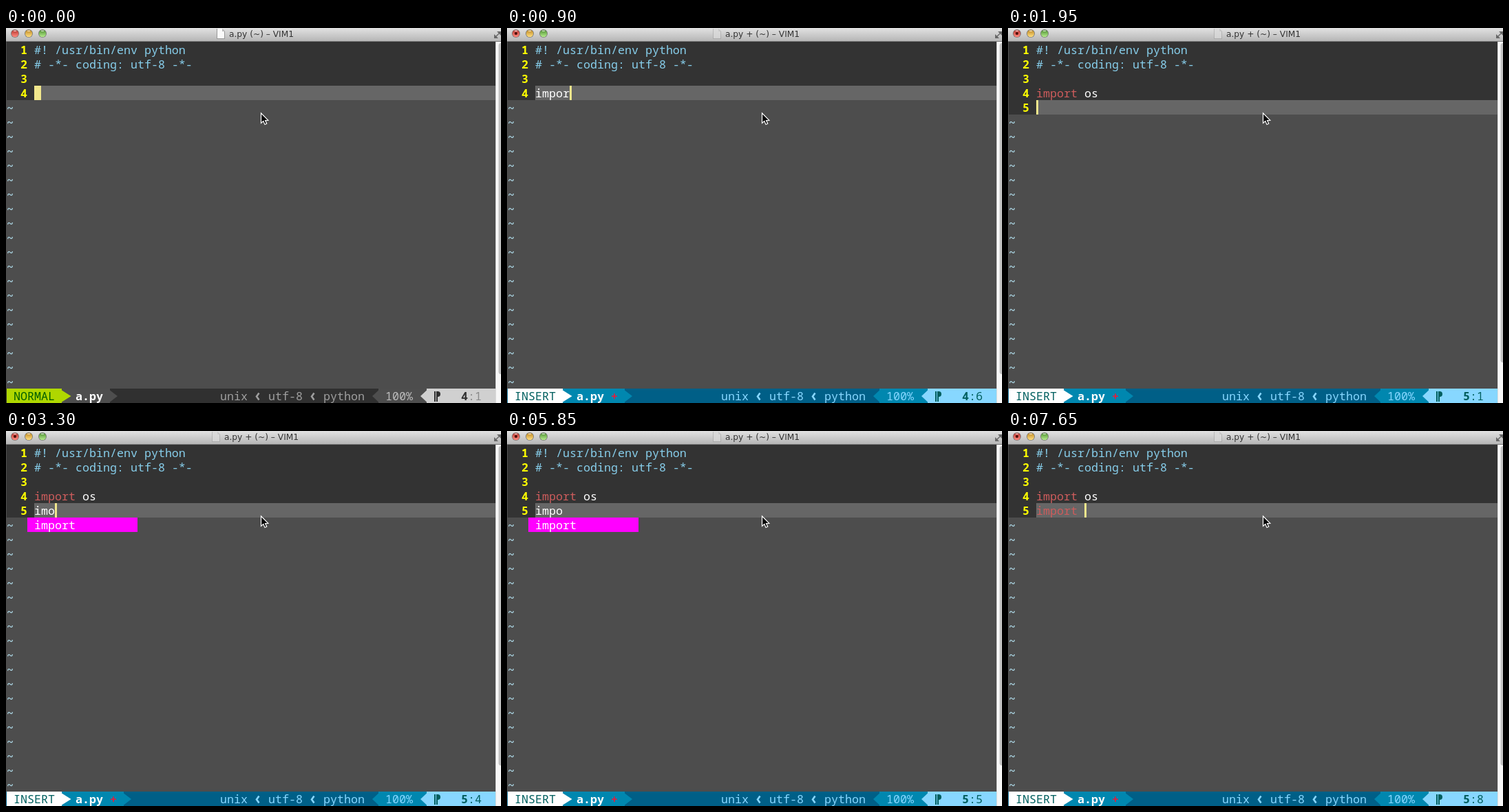
Animation, 719 px wide and 546 px high, one loop 8000 ms. Source, as an HTML page with a canvas:

```html
<!DOCTYPE html>
<html lang="en">
<head>
<meta charset="utf-8">
<title>Typing in an editor</title>
<style>
  html, body { margin: 0; width: 100%; height: 100%; overflow: hidden; background: #4d4d4d; }
  canvas { display: block; }
</style>
</head>
<body>
<canvas id="stage" width="719" height="546"></canvas>
<script>
const ctx = document.getElementById('stage').getContext('2d');
const LOOP = 8000, CELL = 10, ROW = 21, LEFT = 1, TEXT_X = 41, STATUS_Y = 525;
const MONO = '16.667px "Noto Sans Mono", "DejaVu Sans Mono", monospace';

const themes = {
  NORMAL: { mode: '#afd700', modeText: '#005f00', file: '#4e4e4e', middle: '#303030',
            info: '#9e9e9e', percent: '#bcbcbc', line: '#d0d0d0', lineText: '#303030', column: '#8a8a8a' },
  INSERT: { mode: '#ffffff', modeText: '#005f5f', file: '#0087af', middle: '#005f87',
            info: '#87d7ff', percent: '#87d7ff', line: '#87d7ff', lineText: '#005f5f', column: '#005f5f' }
};

// Each step changes only the listed parts of the editor state.
const steps = [
  { at: 0, mode: 'NORMAL', line: 4, text: '', pos: '4:1', cursor: true, popup: false, edited: false },
  { at: 300, mode: 'INSERT' },
  { at: 450, text: 'i', pos: '4:2', edited: true },
  { at: 600, text: 'im', pos: '4:3' },
  { at: 900, text: 'impor', pos: '4:6' },
  { at: 1050, text: 'import', pos: '4:7', keyword: true },
  { at: 1200, text: 'import ', pos: '4:8' },
  { at: 1500, text: 'import o', pos: '4:9' },
  { at: 1800, text: 'import os', pos: '4:10' },
  { at: 1950, line: 5, text: '', pos: '5:1', keyword: false },
  { at: 2700, text: 'i', pos: '5:2' },
  { at: 2850, text: 'im', pos: '5:3', popup: true },
  { at: 3300, text: 'imo', pos: '5:4' },
  { at: 3900, text: 'im' },
  { at: 4650, cursor: false },
  { at: 4950, cursor: true },
  { at: 5100, text: 'imp', popup: false },
  { at: 5250, text: 'impo', pos: '5:5', popup: true },
  { at: 5850, cursor: false },
  { at: 6150, cursor: true },
  { at: 6600, text: 'impor', pos: '5:6' },
  { at: 7350, cursor: false },
  { at: 7500, text: 'import', cursor: true, popup: false },
  { at: 7650, text: 'import ', pos: '5:8', keyword: true }
];

const stateAt = time => Object.assign({}, ...steps.filter(step => step.at <= time));

function rect(x, y, w, h, color) {
  ctx.fillStyle = color;
  ctx.fillRect(x, y, w, h);
}

function polygon(points, color) {
  ctx.fillStyle = color;
  ctx.beginPath();
  points.forEach(([x, y]) => ctx.lineTo(x, y));
  ctx.closePath();
  ctx.fill();
}

function circle(x, y, r, color) {
  ctx.fillStyle = color;
  ctx.beginPath();
  ctx.arc(x, y, r, 0, Math.PI * 2);
  ctx.fill();
}

// Monospaced text, with y at the top of its row.
function write(text, x, y, color, weight = 500) {
  ctx.font = `${weight} ${MONO}`;
  ctx.fillStyle = color;
  ctx.fillText(text, x, y + 17);
}

function verticalGradient(top, bottom, from, to) {
  const gradient = ctx.createLinearGradient(0, top, 0, bottom);
  gradient.addColorStop(0, from);
  gradient.addColorStop(1, to);
  return gradient;
}

function drawTitleBar(edited) {
  rect(0, 0, 719, 20, verticalGradient(0, 20, '#e2e2e2', '#b4b4b4'));
  rect(0, 19, 719, 1, '#777777');

  [['#b8362f', '#ff8a80'], ['#c08a24', '#ffdf80'], ['#4f9132', '#b5ec8c']].forEach(([dark, light], i) => {
    const x = 13 + 20 * i;
    circle(x, 8, 6, '#777777');
    circle(x, 8, 5.2, verticalGradient(3, 13, dark, light));
    rect(x - 2, 3.5, 4, 1.5, '#ffffffaa');
  });
  if (edited) circle(13, 8, 2, '#4a0c08');

  const x = edited ? 317 : 324;
  ctx.globalAlpha = edited ? 0.5 : 1;
  polygon([[x - 18, 1], [x - 10, 1], [x - 6, 5], [x - 6, 16], [x - 18, 16]], '#999999');
  polygon([[x - 17, 1], [x - 10, 1], [x - 7, 5], [x - 7, 15], [x - 17, 15]], '#fafafa');
  polygon([[x - 10, 1], [x - 6, 5], [x - 10, 5]], '#bbbbbb');
  ctx.globalAlpha = 1;
  ctx.font = '12.2px "DejaVu Sans", sans-serif';
  ctx.fillStyle = '#333333';
  ctx.fillText(`a.py ${edited ? '+ ' : ''}(~) – VIM1`, x, 13);

  polygon([[713, 5], [719, 5], [719, 11]], '#666666');
  polygon([[709, 9], [709, 15], [715, 15]], '#666666');
  ctx.strokeStyle = '#666666';
  ctx.lineWidth = 1.5;
  ctx.beginPath();
  ctx.moveTo(711, 13);
  ctx.lineTo(717, 7);
  ctx.stroke();
}

function drawScrollBar(line) {
  const end = line === 4 ? 504 : 487;
  rect(711, 20, 8, 526, '#f7f7f7');
  rect(711, 20, 1, 526, '#dddddd');
  ctx.fillStyle = '#c1c1c1';
  ctx.beginPath();
  ctx.roundRect(715.5, 22, 7, end - 22, 3.5);
  ctx.fill();
}

function drawCode(text, y, keyword) {
  const split = keyword ? 6 : 0;
  write(text.slice(0, split), TEXT_X, y, '#cd5c5c');
  write(text.slice(split), TEXT_X + split * CELL, y, '#ffffff');
}

function drawBuffer({ mode, line, text, keyword, cursor, popup }) {
  const y = line * ROW;
  rect(0, 20, 711, 505, '#4d4d4d');
  rect(1, 20, 710, y + ROW - 20, '#333333');
  rect(TEXT_X, y, 670, ROW, '#666666');

  for (let n = 1; n < 25; n++) {
    if (n <= line) write(String(n), 21, n * ROW, '#ffff00', 600);
    else write('~', LEFT, n * ROW + 1, '#add8e6', 700);
  }
  write('#! /usr/bin/env python', TEXT_X, ROW, '#87ceeb');
  write('# -*- coding: utf-8 -*-', TEXT_X, 2 * ROW, '#87ceeb');
  if (line === 5) drawCode('import os', 4 * ROW, true);
  drawCode(text, y, keyword);

  if (cursor) rect(TEXT_X + text.length * CELL, y, mode === 'NORMAL' ? CELL : 3, ROW, '#f0e68c');
  if (popup) {
    rect(31, y + ROW, 160, ROW, '#ff00ff');
    write('import', TEXT_X, y + ROW, '#ffffff');
  }
}

function arrow(x, direction, color, length = 9) {
  polygon([[x, 527.5], [x + direction * length, 536], [x, 544.5]], color);
}

function chevron(x, color) {
  ctx.strokeStyle = color;
  ctx.lineWidth = 2.6;
  ctx.beginPath();
  ctx.moveTo(x + 7.5, 531.5);
  ctx.lineTo(x + 4, 536.5);
  ctx.lineTo(x + 7.5, 541.5);
  ctx.stroke();
}

function lineSymbol(x, y, color) {
  rect(x, y, 2, 15, color);
  rect(x + 3, y, 2, 15, color);
  ctx.beginPath();
  ctx.arc(x + 5, y + 4, 4, -Math.PI / 2, Math.PI / 2);
  ctx.fill();
}

function drawStatus({ mode, pos, edited }) {
  const c = themes[mode], y = STATUS_Y;
  const fileEnd = edited ? 171 : 151;
  rect(0, y, 711, ROW, c.middle);
  rect(LEFT, y, 80, ROW, c.mode);
  rect(81, y, fileEnd - 81, ROW, c.file);
  rect(541, y, 70, ROW, c.file);
  rect(611, y, 100, ROW, c.line);
  arrow(81, 1, c.mode, 13.5);
  arrow(fileEnd, 1, c.file, 11);
  arrow(541, -1, c.file);
  arrow(611, -1, c.line);

  write(mode, 11, y, c.modeText);
  write('a.py', 101, y, '#ffffff', 700);
  if (edited) write('+', 151, y, '#df2040', 700);
  write('unix', 311, y, c.info);
  write('utf-8', 381, y, c.info);
  write('python', 461, y, c.info);
  chevron(360, c.info);
  chevron(440, c.info);
  write('100%', 551, y, c.percent);
  lineSymbol(622, 529, c.lineText);
  write(pos[0], 661, y, c.lineText, 600);
  write(pos.slice(1), 671, y, c.column);
}

function drawPointer() {
  ctx.save();
  ctx.translate(370.5, 124);
  ctx.beginPath();
  [[0, 0], [0, 14.5], [3.3, 11.5], [5.5, 16.5], [8.2, 15.3], [6, 10.6], [10.3, 10.4]]
    .forEach(([x, y]) => ctx.lineTo(x, y));
  ctx.closePath();
  ctx.fillStyle = '#000000';
  ctx.strokeStyle = '#ffffff';
  ctx.lineWidth = 1.2;
  ctx.fill();
  ctx.stroke();
  ctx.restore();
}

const start = performance.now();

function render() {
  const state = stateAt((performance.now() - start) % LOOP);
  drawTitleBar(state.edited);
  drawBuffer(state);
  drawStatus(state);
  drawScrollBar(state.line);
  drawPointer();
  requestAnimationFrame(render);
}
render();
</script>
</body>
</html>
```
